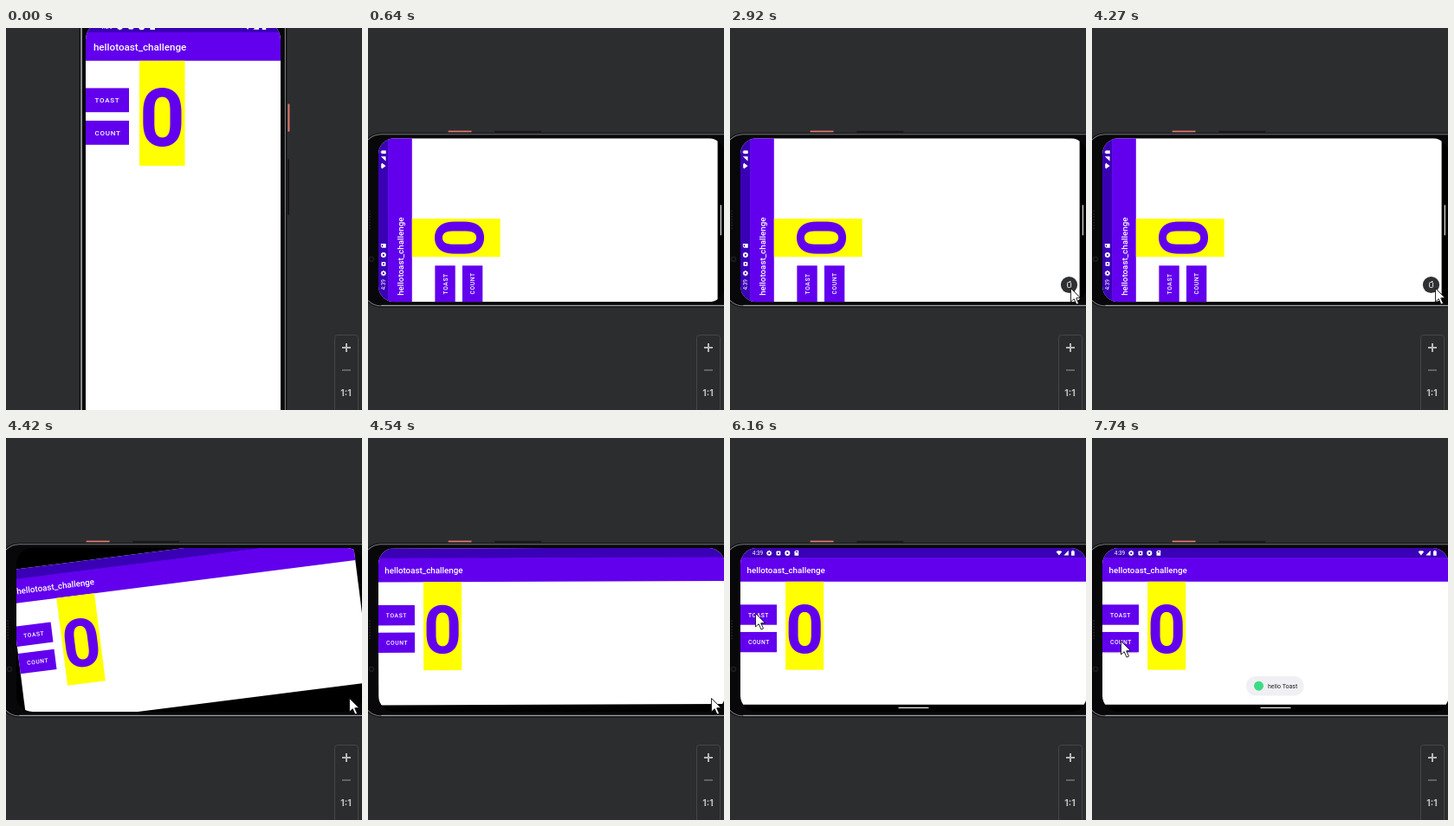
Recreate the animation shown at these times as an HTML page with a canvas. Size 411 by 441 pixels, loop 7990 ms.

```html
<!DOCTYPE html>
<html lang="en">
<head>
<meta charset="utf-8">
<style>
  html, body { margin: 0; width: 100%; height: 100%; overflow: hidden; background: #2c2d2f; }
  canvas { display: block; width: 411px; height: 441px; }
</style>
</head>
<body>
<canvas id="stage" width="411" height="441"></canvas>
<script>
const ctx = document.getElementById('stage').getContext('2d');
const LOOP = 7990, STEP = 123.5;
const SHORT = 225, LONG = 476, SCALE = 0.84;
const PURPLE = '#6200ee', DARK_PURPLE = '#3a00b5';
const TURNED = 640, SPIN = 4400, UPRIGHT = 4650;

// Stops of the pointer; it eases from each to the next.
const stops = [
  { t: 1070, x: 99, y: 2 },
  { t: 1560, x: 402, y: 330 },
  { t: 1687, x: 390, y: 333 },
  { t: 1935, x: 402, y: 306 },
  { t: 2420, x: 393, y: 300 },
  { t: 3410, x: 393, y: 300 },
  { t: 3780, x: 387, y: 297 },
  { t: 4280, x: 396, y: 300 },
  { t: 4528, x: 396, y: 300 },
  { t: 5140, x: 65, y: 217 },
  { t: 5640, x: 29, y: 202 },
  { t: 6750, x: 29, y: 202 },
  { t: 7240, x: 33, y: 234 }
];

const between = (t, a, b) => t >= a && t < b;
const clamp = p => Math.min(1, Math.max(0, p));
const smooth = p => p * p * (3 - 2 * p);
const lerp = (a, b, p) => a + (b - a) * p;
const sampled = t => 1070 + Math.floor((t - 1030) / STEP) * STEP;

function rect(x, y, w, h, color) {
  ctx.fillStyle = color;
  ctx.fillRect(x, y, w, h);
}

function roundRect(x, y, w, h, r, fill, stroke, lineWidth = 1) {
  ctx.beginPath();
  ctx.roundRect(x, y, w, h, r);
  paint(fill, stroke, lineWidth);
}

function paint(fill, stroke, lineWidth) {
  if (fill) {
    ctx.fillStyle = fill;
    ctx.fill();
  }
  if (stroke) {
    ctx.strokeStyle = stroke;
    ctx.lineWidth = lineWidth;
    ctx.stroke();
  }
}

function disc(x, y, r, fill, stroke, lineWidth) {
  ctx.beginPath();
  ctx.arc(x, y, r, 0, Math.PI * 2);
  paint(fill, stroke, lineWidth);
}

function poly(points, fill, stroke, lineWidth) {
  ctx.beginPath();
  points.forEach(([x, y]) => ctx.lineTo(x, y));
  ctx.closePath();
  paint(fill, stroke, lineWidth);
}

function text(str, x, y, font, color, { spacing = 0, align = 'left' } = {}) {
  ctx.font = font + ', sans-serif';
  ctx.letterSpacing = spacing + 'px';
  ctx.textAlign = align;
  ctx.fillStyle = color;
  ctx.fillText(str, x, y);
}

function group(draw) {
  ctx.save();
  draw();
  ctx.restore();
}

function phoneBody() {
  roundRect(-7, -23, 239, 560, 26, '#08080a', '#1a1a1c');
  roundRect(-5.2, -21.5, 235.6, 556, 25, null, '#77797c', 1.2);
  // the left rim catches more light
  rect(-5.6, 4, 1.4, 500, '#a0a2a5');
  rect(233.4, 96, 2, 32, '#e2776b');
  rect(233, 160, 2, 64, '#151517');
  for (let i = 0; i < 7; i++) rect(100 + i * 4, -12.5, 2.2, 1.5, '#29292b');
  disc(59, -9.5, 4, '#1c1d20');
  disc(59, -9.5, 2, '#08080a');
}

function statusIcons(width) {
  text('4:39', 16.4, 9.6, '400 7.7px Roboto', '#fff');
  disc(39.5, 7, 2.2, null, '#fff', 1.8);
  for (let i = 0; i < 8; i++) {
    const a = i * Math.PI / 4;
    disc(39.5 + 3.2 * Math.cos(a), 7 + 3.2 * Math.sin(a), 0.7, '#fff');
  }
  roundRect(49.4, 4.2, 5.8, 5.8, 1, '#fff');
  rect(51.3, 6, 2, 2.2, DARK_PURPLE);
  disc(64.6, 7, 3.6, '#fff');
  disc(64.6, 7, 1.3, DARK_PURPLE);
  poly([[76, 3.4], [80, 3.4], [80, 10.4], [74.4, 10.4], [74.4, 5]], '#fff');
  rect(76, 4.6, 2.6, 1.4, DARK_PURPLE);

  const x = width - 38;
  poly([[x - 4, 5], [x - 2, 3.8], [x + 2, 3.8], [x + 4, 5], [x, 10.2]], '#fff');
  poly([[x + 13, 3.4], [x + 13, 10.2], [x + 6.5, 10.2]], '#fff');
  rect(x + 16.8, 4.2, 4.4, 6.2, '#fff');
  rect(x + 18, 3.2, 2, 1.2, '#fff');
}

function button(label, y, raised) {
  if (raised) rect(0, y + 27.8, 48, 1.4, 'rgba(0,0,0,.2)');
  rect(0, y, 50, 27.8, PURPLE);
  text(label, 10.6, y + 16.9, '500 8px Roboto', '#fff', { spacing: 0.7 });
}

function app(width, height, t, ready) {
  rect(0, 0, width, height, '#000');
  rect(0, 0, width, height - 9.8, '#fff');
  rect(0, 0, width, 14, DARK_PURPLE);
  rect(0, 13.3, width, 32.9, PURPLE);
  text('hellotoast_challenge', 8.9, 34.2, '500 11.65px Roboto', '#fff');
  button('TOAST', 77.8, between(t, 5910, 6160));
  button('COUNT', 115.4, t >= 7740);
  rect(62, 46.2, 52.5, 121.2, '#ff0');
  text('0', 88.3, 144, '700 92px Roboto', PURPLE, { align: 'center' });
  if (ready) {
    statusIcons(width);
    rect(width / 2 - 20.8, height - 6, 41.6, 1.3, '#fff');
  }
}

function screen(width, height, draw) {
  group(() => {
    roundRect(0, 0, width, height, 22);
    ctx.clip();
    draw();
  });
}

function uprightPhone(t) {
  group(() => {
    ctx.translate(92, -8.4);
    phoneBody();
    screen(SHORT, LONG, () => app(SHORT, LONG, t, true));
  });
}

function sidewaysPhone(t) {
  group(() => {
    ctx.translate(12, 316.3);
    ctx.rotate(-Math.PI / 2);
    ctx.scale(SCALE, SCALE);
    phoneBody();
    if (t < SPIN) screen(SHORT, LONG, () => app(SHORT, LONG, t, true));
  });
  if (t >= SPIN) landscapeScreen(t);
}

function landscapeScreen(t) {
  const left = 1 - clamp((sampled(t) - 4246) / 400);
  const angle = -Math.PI / 2 * left ** 5;
  group(() => {
    ctx.translate(12, 127);
    ctx.scale(SCALE, SCALE);
    screen(LONG, SHORT, () => {
      rect(0, 0, LONG, SHORT, '#000');
      ctx.translate(LONG / 2, SHORT / 2);
      ctx.rotate(angle);
      ctx.translate(-LONG / 2, -SHORT / 2);
      app(LONG, SHORT, t, t >= UPRIGHT);
    });
  });
}

function rotateButton(t) {
  disc(391.5, 296.5, 9.6, t < 2670 ? '#17181a' : '#2f3032');
  if (t < 1910) return;
  roundRect(389.6, 293.6, 4, 5.8, 0.8, null, '#e4e4e4');
  rect(392, 292, 1.4, 1, '#e4e4e4');
}

function toast(t) {
  group(() => {
    ctx.globalAlpha = smooth(clamp((sampled(t) - 6135) / 490));
    roundRect(178, 275, 66.5, 22.6, 11.3, '#f0eff3');
    disc(192.5, 286.2, 5.5, '#3ddc84');
    text('hello Toast', 203, 288.6, '400 7px Roboto', '#222');
  });
}

function zoomPanel() {
  roundRect(379.5, 354.5, 27, 100, 3, '#2b2c2e', '#454648');
  rect(388, 368, 10, 2, '#b5b7b9');
  rect(392, 364, 2, 10, '#b5b7b9');
  rect(388, 394, 10, 2, '#606264');
  text('1:1', 392.6, 425, '700 10.5px Inter', '#bfc1c3', { align: 'center' });
}

function drawPointer(t) {
  if (t < stops[0].t) return;
  const time = sampled(t);
  const next = stops.findIndex(stop => stop.t > time);
  const b = stops.at(next);
  const a = next < 0 ? b : stops[next - 1];
  const p = a === b ? 1 : smooth((time - a.t) / (b.t - a.t));
  group(() => {
    ctx.translate(lerp(a.x, b.x, p) + 0.5, lerp(a.y, b.y, p) + 0.5);
    poly([[0, 0], [0, 15.5], [3.7, 12.2], [6.5, 18.6], [9, 17.5], [6.2, 11.3], [11, 11]],
      '#fff', '#111', 0.9);
  });
}

function render(t) {
  rect(0, 0, 411, 441, '#2c2d2f');
  if (t < TURNED) uprightPhone(t);
  else sidewaysPhone(t);
  if (between(t, 1430, SPIN)) rotateButton(t);
  toast(t);
  zoomPanel();
  drawPointer(t);
}

const start = performance.now();
function tick() {
  render((performance.now() - start) % LOOP);
  requestAnimationFrame(tick);
}
tick();
</script>
</body>
</html>
```
